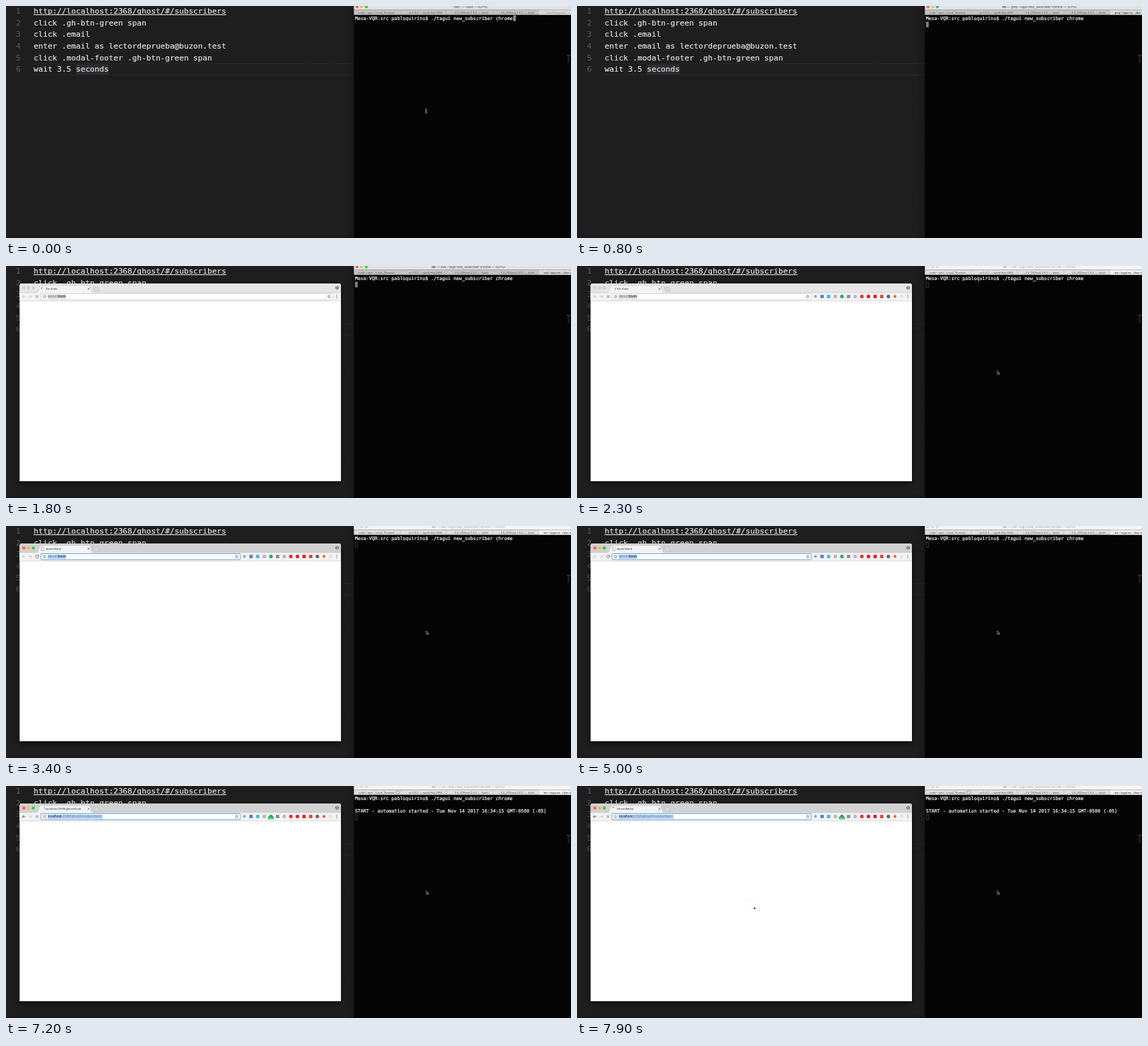
An HTML page for the animation above (8000 ms loop, 808 px wide and 332 px high).

```html
<!DOCTYPE html>
<html lang="en">
<head>
<meta charset="utf-8">
<title>Scripted browser run</title>
<style>
  html, body { margin: 0; width: 100%; height: 100%; overflow: hidden; background: #1e1e1e; }
  svg { display: block; width: 808px; height: 332px; }
  text { white-space: pre; }
  .code { font: 11.16px "DejaVu Sans Mono", monospace; fill: #e2e2e2; stroke: #e2e2e2; stroke-width: .2; }
  .num { fill: #5c5c5c; stroke: none; text-anchor: end; }
  .term { font: 6.7px "DejaVu Sans Mono", monospace; fill: #f4f4f4; stroke: #f4f4f4; stroke-width: .2; }
  .ui { font: 4.26px "Liberation Sans", Arial, sans-serif; fill: #333; }
  .url { font-size: 5px; fill: #7d8288; }
  .url .host { fill: #222; }
  .tab { font-size: 4px; text-anchor: middle; fill: #555; }
  .title { font-size: 4.6px; text-anchor: middle; fill: #555; }
  .off { fill: #b4b4b4; }
  .line { fill: none; stroke: #666; stroke-width: .8; }
  .dim { stroke: #c4c4c4; }
  #browser { filter: drop-shadow(0 3px 4px rgba(0,0,0,.6)); }
</style>
</head>
<body>
<svg viewBox="0 0 808 332">
  <defs>
    <linearGradient id="edge">
      <stop offset="0" stop-color="#000" stop-opacity="0"/>
      <stop offset="1" stop-color="#000" stop-opacity=".2"/>
    </linearGradient>
  </defs>

  <g id="editor">
    <rect width="808" height="332" fill="#1e1e1e"/>
    <rect x="100" y="83.5" width="47" height="14.5" fill="#2c2c30"/>
    <path d="M39 82.5H800M39 98.5H800M801.5 0V332" stroke="#303030" stroke-dasharray="1 1"/>
    <path d="M39.5 12.5H315" stroke="#e2e2e2"/>
    <rect y="328" width="498" height="4" fill="#1b1b1b"/>
    <rect x="484" width="14" height="332" fill="url(#edge)"/>
  </g>

  <g id="terminal">
    <rect x="497.5" width="310.5" height="332" fill="#000" fill-opacity=".88"/>
    <g data-on="0 2300">
      <rect x="497.5" width="310.5" height="5.5" fill="#e2e2e2"/>
      <rect x="497.5" y="5.5" width="310.5" height="7" fill="#c3c3c3"/>
      <rect x="762" y="5.5" width="46" height="7" fill="#d8d8d8"/>
      <circle cx="502" cy="1" r="2.2" fill="#fc605b"/>
      <circle cx="508.7" cy="1" r="2.2" fill="#fdbc40"/>
      <circle cx="515.4" cy="1" r="2.2" fill="#34c84a"/>
    </g>
    <g data-on="2300 8000">
      <rect x="497.5" width="310.5" height="5.5" fill="#f5f5f5"/>
      <rect x="497.5" y="5.5" width="310.5" height="7" fill="#dedede"/>
      <rect x="762" y="5.5" width="46" height="7" fill="#efefef"/>
      <g fill="#e4e4e4" stroke="#ccc" stroke-width=".5">
        <circle cx="502" cy="1" r="2"/><circle cx="508.7" cy="1" r="2"/><circle cx="515.4" cy="1" r="2"/>
      </g>
    </g>
    <path d="M497.5 5.5H808M497.5 12.4H808M564 5.5v7M630 5.5v7M696 5.5v7M762 5.5v7" stroke="#aaa" stroke-width=".5"/>
    <g id="titles"></g>
    <g data-on="6900 8000">
      <rect x="558" y="7" width="4" height="4" rx=".8" fill="#eee" stroke="#777" stroke-width=".7"/>
    </g>
    <path d="M801.5 70.5H808M804.5 70.5V82" fill="none" stroke="#252525" stroke-width="1.8"/>
    <text class="term" x="499" y="19.6">Mesa-VQR:src pabloquirino$ ./tagui new_subscriber chrome</text>
    <text class="term" x="499" y="37.8" data-on="6600 8000">START - automation started - Tue Nov 14 2017 16:34:15 GMT-0500 (-05)</text>
    <rect x="725.2" y="13.5" width="4" height="8" fill="#8c8c8c" data-on="0 300"/>
    <rect x="499" y="22.5" width="4" height="8" fill="#7d7d7d" data-on="300 2300"/>
    <rect x="499.5" y="23" width="3.5" height="7.5" fill="none" stroke="#484848" stroke-width=".7" data-on="2300 6600"/>
    <rect x="499.5" y="41" width="3.5" height="7.5" fill="none" stroke="#484848" stroke-width=".7" data-on="6600 8000"/>
    <path d="M599 147.5q1.8 0 1.8 1v4q0 1-1.8 1M602.6 147.5q-1.8 0-1.8 1v4q0 1 1.8 1" fill="none" stroke="#a8a8a8" stroke-width=".7" data-on="0 300"/>
    <path d="M601 149.8v5l1.2-1 .9 2 .8-.4-.9-1.9h1.5z" fill="#111" stroke="#ccc" stroke-width=".5" data-on="2300 8000"/>
  </g>

  <g id="browser" data-on="1800 8000">
    <path d="M19.5 308V28q0-3 3-3H476q3 0 3 3V308z" fill="#fff"/>
    <path d="M19.5 38V28q0-3 3-3H476q3 0 3 3V38z" fill="#e6e6e6" data-on="1800 2500"/>
    <path d="M19.5 38V28q0-3 3-3H476q3 0 3 3V38z" fill="#d2d2d2" data-on="2500 8000"/>
    <path d="M124.5 30.5h6.5q1 0 1.4 1l1.7 4.5h-6.6q-1 0-1.4-1z" fill="#d9d9d9" stroke="#b2b2b2" stroke-width=".5"/>
    <rect x="19.5" y="38" width="459.5" height="12" fill="#f3f3f3"/>
    <path d="M43.5 38.2q1.5 0 2-1.5l2.6-7.5q.5-1.4 2-1.4H118q1.5 0 2 1.4l2.8 7.5q.5 1.5 2 1.5z" fill="#f3f3f3"/>
    <path d="M19.5 38H43.5q1.5 0 2-1.5l2.6-7.5q.5-1.4 2-1.4H118q1.5 0 2 1.4l2.8 7.5q.5 1.5 2 1.5H479M19.5 50H479" fill="none" stroke="#b8b8b8" stroke-width=".5"/>
    <g data-on="1800 2500" fill="#d2d2d2" stroke="#c0c0c0" stroke-width=".4">
      <circle cx="25.5" cy="31.5" r="2.1"/><circle cx="32.2" cy="31.5" r="2.1"/><circle cx="39" cy="31.5" r="2.1"/>
    </g>
    <g data-on="2500 8000">
      <circle cx="25.5" cy="31.5" r="2.3" fill="#fc605b"/>
      <circle cx="32.2" cy="31.5" r="2.3" fill="#fdbc40"/>
      <circle cx="39" cy="31.5" r="2.3" fill="#34c84a"/>
    </g>
    <path class="line" d="M116.7 31.3l2.6 2.6M119.3 31.3l-2.6 2.6"/>
    <circle cx="473.5" cy="31.3" r="2.4" fill="#555"/>
    <circle cx="473.5" cy="30.7" r="1" fill="#ddd"/>
    <path d="M472 32.8q1.5-1.4 3 0" stroke="#ddd" stroke-width=".7" fill="none"/>

    <path d="M50.5 29.8h2.2l1.4 1.4v4h-3.6z" fill="#fff" stroke="#777" stroke-width=".5" data-on="3000 6800"/>
    <path class="line spin" d="M53 30a2.2 2.2 0 0 1 2.2 2.2" data-at="53 32.2" data-on="1800 3000"/>
    <path class="line spin" d="M53 30a2.2 2.2 0 0 1 2.2 2.2" data-at="53 32.2" data-on="6800 8000"/>
    <text class="ui" x="56.8" y="34" data-on="1800 3000">Sin título</text>
    <text class="ui" x="56.8" y="34" data-on="3000 7000">about:blank</text>
    <text class="ui" x="56.8" y="34" data-on="7000 7300">localhost:2368/ghost/#/sub</text>
    <text class="ui" x="56.8" y="34" data-on="7300 8000">Ghost Admin</text>

    <path class="line dim" d="M28 43.7h-4.6M25.4 41.6l-2.1 2.1 2.1 2.1"/>
    <path class="line" d="M28 43.7h-4.6M25.4 41.6l-2.1 2.1 2.1 2.1" data-on="7000 8000"/>
    <path class="line dim" d="M32.2 43.7h4.6M34.8 41.6l2.1 2.1-2.1 2.1"/>
    <g data-on="3000 6800">
      <path class="line" d="M46.3 42.7a2.1 2.1 0 1 0 .1 1.6"/>
      <path d="M47 41.2v2.2h-2.2z" fill="#666"/>
    </g>
    <path class="line" d="M42.6 41.8l3.8 3.8M46.4 41.8l-3.8 3.8" data-on="1800 3000"/>
    <path class="line" d="M42.6 41.8l3.8 3.8M46.4 41.8l-3.8 3.8" data-on="6800 8000"/>

    <rect x="50" y="39.5" width="417" height="8.6" rx="1" fill="#fff" stroke="#c4c4c4" stroke-width=".6" data-on="1800 2000"/>
    <rect x="50" y="39.5" width="285" height="8.6" rx="1" fill="#fff" stroke="#c4c4c4" stroke-width=".6" data-on="2000 2500"/>
    <rect x="50" y="39.5" width="285" height="8.6" rx="1" fill="#fff" stroke="#5b9be6" stroke-width=".9" data-on="2500 8000"/>
    <circle class="line" cx="55.2" cy="43.7" r="1.9" style="stroke-width:.6"/>
    <path d="M55.2 43.4v1.4M55.2 42.3v.6" stroke="#666" stroke-width=".6"/>
    <rect x="59.5" y="41" width="26.5" height="5.8" fill="#d6d6d6" data-on="1800 2500"/>
    <rect x="59.5" y="41" width="26.5" height="5.8" fill="#b0d2fb" data-on="2500 6800"/>
    <rect x="59.5" y="41" width="78.5" height="5.8" fill="#b0d2fb" data-on="6800 8000"/>
    <text class="ui url" x="59.8" y="45.4" data-on="1800 6800">about:<tspan class="host">blank</tspan></text>
    <text class="ui url" x="59.8" y="45.4" data-on="6800 8000"><tspan class="host">localhost</tspan>:2368/ghost/#/subscribers</text>
    <path id="star" class="line" style="stroke-width:.6"/>
    <g id="tools" data-on="2000 8000"></g>
    <g data-on="7200 8000">
      <rect x="374.8" y="43.8" width="8" height="3.8" rx=".6" fill="#1fa65a"/>
      <text class="ui" x="375.7" y="46.9" style="font-size:3.2px;fill:#fff">new</text>
    </g>
    <g fill="#666">
      <circle cx="473" cy="41.7" r=".6"/><circle cx="473" cy="43.7" r=".6"/><circle cx="473" cy="45.7" r=".6"/>
    </g>

    <g data-on="7600 8000">
      <circle cx="249.5" cy="169.5" r="8.6" fill="none" stroke="#f3f3f3" stroke-width=".7"/>
      <circle id="dot" cx="249.5" cy="162.3" r="1.3" fill="#3c4043"/>
    </g>
  </g>
</svg>
<script>
const LOOP = 8000, STEP = 100;
const $ = id => document.getElementById(id);

function add(parent, tag, attrs, text = "") {
  const el = document.createElementNS("http://www.w3.org/2000/svg", tag);
  for (const key in attrs) el.setAttribute(key, attrs[key]);
  el.textContent = text;
  return parent.appendChild(el);
}

// Editor lines
[
  "http://localhost:2368/ghost/#/subscribers",
  "click .gh-btn-green span",
  "click .email",
  "enter .email as lectordeprueba@buzon.test",
  "click .modal-footer .gh-btn-green span",
  "wait 3.5 seconds"
].forEach((line, i) => {
  const y = 11 + i * 16.65;
  add($("editor"), "text", { class: "code num", x: 21, y }, i + 1);
  add($("editor"), "text", { class: "code", x: 39.5, y }, line);
});

// Terminal tabs and window titles
[
  [533, "node ‹ npm…Local_Terminal  …"],
  [601, "…or-1.6.2 — ngrok http 2368  …"],
  [663.5, "…1.6_2/Ghost-1.6.2 — -bash"],
  [729.5, "…1.6_2/Ghost-1.6.2 — -bash"]
].forEach(([x, name]) => add($("titles"), "text", { class: "ui tab", x, y: 10.5 }, name));

[
  [0, 400, ""],
  [400, 600, "bash"],
  [600, 800, "php"],
  [800, 900, "grep"],
  [900, 1100, "php"],
  [1100, 2300, "sed"],
  [2300, LOOP, "tee"]
].forEach(([from, to, job]) => {
  const on = from + " " + to;
  const idle = from >= 2300 ? " off" : "";
  const title = job ? `src — ${job} ‹ tagui new_subscriber chrome — 63×43` : "src — -bash — 63×43";
  const tab = job ? `${job} ‹ tagui ne…riber chrome` : "…e/tools/tagui/src — -bash";
  add($("titles"), "rect", { x: job ? 609.5 : 640, y: 0, width: 4.5, height: 3, rx: .6, fill: idle ? "#cfe3f2" : "#8cc4ea", "data-on": on });
  add($("titles"), "text", { class: "ui title" + idle, x: job ? 661 : 666, y: 3.1, "data-on": on }, title);
  add($("titles"), "text", {
    class: "ui tab", x: 769, y: 10.5, "data-on": on,
    style: `text-anchor:start;fill:${job ? "#222" : "#888"}`
  }, tab);
});

// Toolbar buttons
[
  "#9aa79d", "#4a86d8", "#52b4e6", "#b9b9b9", "#27ae60", "#8a8f8a", "#b5b3d8",
  "#dc3b35", "#d81f4a", "#d62828", "#e2452c", "#6a6a6a", "#f0592a", "#e3e3e3"
].forEach((fill, i) => {
  const x = 341 + i * 9.48, round = [0, 4, 6, 7, 8, 11, 12, 13].includes(i);
  if (round) add($("tools"), "circle", { cx: x, cy: 43.6, r: i === 12 || i === 0 ? 2 : 2.6, fill });
  else add($("tools"), "rect", { x: x - 2.4, y: 41.2, width: 4.8, height: 4.8, rx: .6, fill });
});

const points = Array.from({ length: 10 }, (_, i) => {
  const r = i % 2 ? 1 : 2.3, a = i * Math.PI / 5;
  return (r * Math.sin(a)).toFixed(2) + " " + (-r * Math.cos(a)).toFixed(2);
});
$("star").setAttribute("d", "M" + points.join("L") + "z");

const timed = [...document.querySelectorAll("[data-on]")].map(el => [el, ...el.dataset.on.split(" ").map(Number)]);
const spinners = [...document.querySelectorAll(".spin")];

function draw(time) {
  const t = Math.floor(time % LOOP / STEP) * STEP;
  for (const [el, from, to] of timed) el.style.display = t >= from && t < to ? "" : "none";
  for (const el of spinners) el.setAttribute("transform", `rotate(${(t - 7900) * .36 - 80} ${el.dataset.at})`);
  $("star").setAttribute("transform", `translate(${t < 2000 ? 462 : 330} 43.8)`);
  $("dot").setAttribute("transform", `rotate(${5 + (t - 7600) * .45} 249.5 169.5)`);
}

const start = performance.now();
function tick() {
  draw(performance.now() - start);
  requestAnimationFrame(tick);
}
tick();
</script>
</body>
</html>
```
